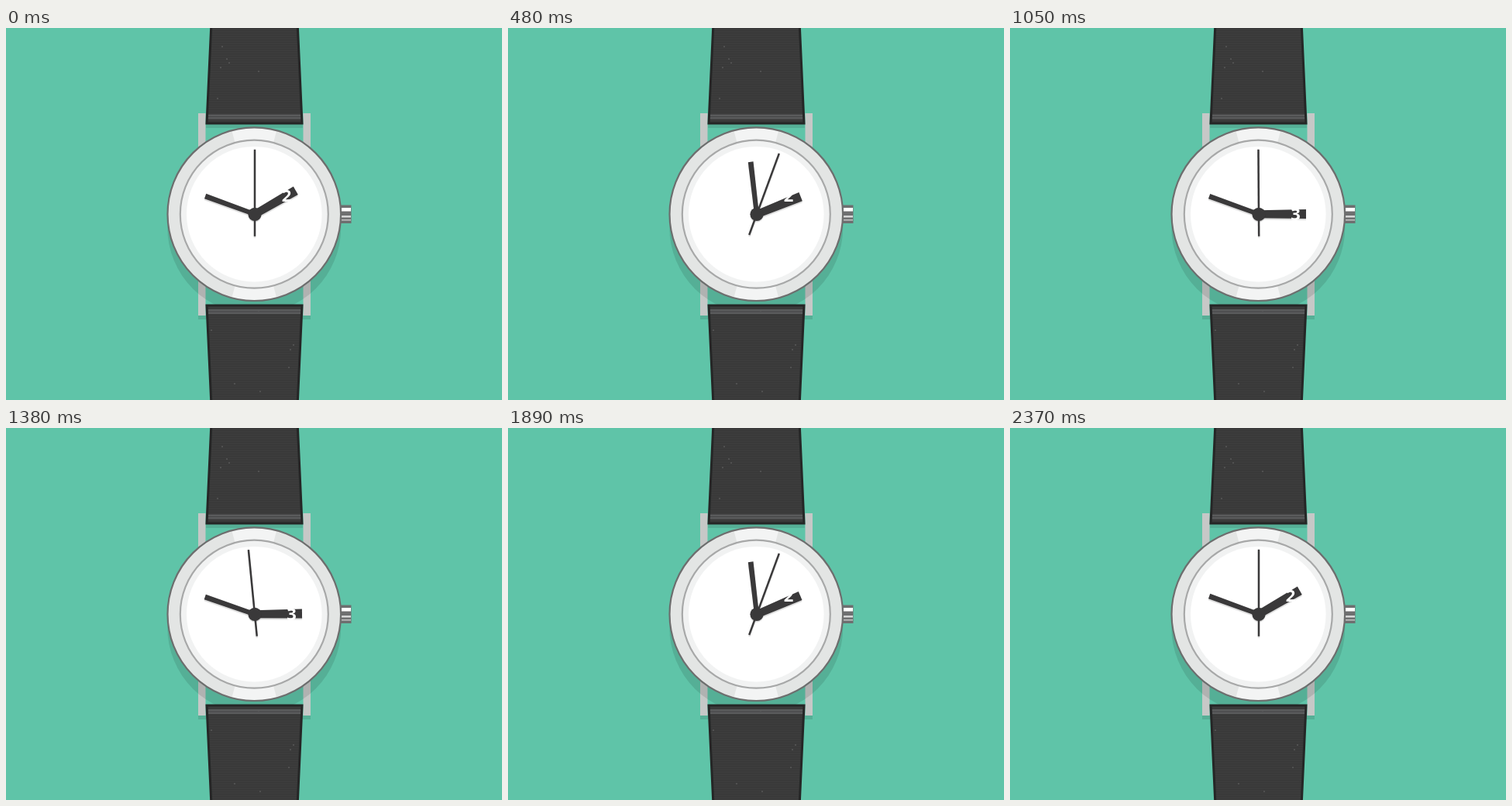
Write an HTML page with a canvas that moves like this. It is 640 by 480 pixels and loops after 2400 ms.

```html
<!DOCTYPE html>
<html lang="en">
<head>
<meta charset="utf-8">
<title>Watch</title>
<style>
  html, body { margin: 0; width: 100%; height: 100%; overflow: hidden; background: #5fc4a8; }
  canvas { display: block; }
</style>
</head>
<body>
<canvas id="stage" width="640" height="480"></canvas>
<script>
const ctx = document.getElementById('stage').getContext('2d');
const CX = 321, CY = 240.3;
const CASE_X = 320.3, CASE_Y = 240.2;
const LOOP = 2400, HALF = 1200, SWEEP = 1170, STEP = 30;
const INK = '#3a393a', SHADOW = 'rgba(0,0,0,.11)', HAND_SHADOW = 'rgba(0,0,0,.13)';

function rect(color, x, y, w, h) {
  ctx.fillStyle = color;
  ctx.fillRect(x, y, w, h);
}

function disc(color, x, y, r, stroke, width) {
  ctx.beginPath();
  ctx.arc(x, y, r, 0, Math.PI * 2);
  ctx.fillStyle = color;
  ctx.fill();
  if (stroke) {
    ctx.strokeStyle = stroke;
    ctx.lineWidth = width;
    ctx.stroke();
  }
}

function polygon(points) {
  const path = new Path2D();
  points.forEach(([x, y]) => path.lineTo(x, y));
  path.closePath();
  return path;
}

// A strap runs from the edge near the case (y0) to outside the stage (y1).
function strap(y0, y1, stripe, specks) {
  const outline = polygon([[259, y0], [382, y0], [376.3, y1], [264.8, y1]]);
  ctx.save();
  ctx.clip(outline);
  rect('#3c3c3c', 250, 0, 140, 480);
  for (let y = Math.min(y0, y1); y < Math.max(y0, y1); y += 3) rect('rgba(0,0,0,.06)', 258, y, 126, 1);
  rect('#5a5b5c', 258, stripe, 126, 6);
  rect('#444546', 258, stripe + 2.5, 126, 1);
  specks.forEach(([x, y]) => disc('#5b5b5b', x, y, 0.9));
  ctx.restore();
  ctx.strokeStyle = '#252626';
  ctx.lineWidth = 3;
  ctx.stroke(outline);
}

function drawWatch() {
  rect('#5fc4a8', 0, 0, 640, 480);
  rect(SHADOW, 248, 371, 145, 5);
  rect(SHADOW, 258, 124, 125, 5);
  for (const x of [248, 383.5]) rect('#c6c8c7', x, 110, 9.5, 261);
  disc(SHADOW, CASE_X, CASE_Y + 17, 112);

  strap(123, -3, 111.5, [[279, 24], [285, 40], [288, 45], [277, 51], [273, 91], [326, 56], [354, 116]]);
  strap(358, 483, 363, [[357, 364], [326, 365], [265, 390], [371, 409], [367, 415], [365, 438], [295, 459], [328, 469]]);

  rect('#6e6f70', 432, 228.5, 13.5, 23.5);
  rect('#ffffff', 433, 232, 12, 4.5);
  rect('#d5d6d6', 433, 242, 12, 2.5);
  rect('#c3c4c4', 433, 247, 12, 1.5);

  disc('#e3e5e4', CASE_X, CASE_Y, 111.8);
  ctx.fillStyle = '#f3f4f4';
  for (const mid of [-Math.PI / 2, Math.PI / 2]) {
    ctx.beginPath();
    ctx.moveTo(CASE_X, CASE_Y);
    ctx.arc(CASE_X, CASE_Y, 111.8, mid - 0.262, mid + 0.262);
    ctx.fill();
  }
  disc('transparent', CASE_X, CASE_Y, 111.8, '#6d6e6e', 2.2);
  disc('#f1f2f2', CASE_X, CASE_Y, 95.5, '#a7a8a8', 2.2);
  disc('#ffffff', CASE_X, CASE_Y, 87.3);
}

// Tapered bar pointing up before rotation, with a shadow just below it.
function hand(degrees, length, tail, baseWidth, tipWidth) {
  const b = baseWidth / 2, w = tipWidth / 2;
  const bar = polygon([[-b, tail], [-w, -length], [w, -length], [b, tail]]);
  for (const [color, drop] of [[HAND_SHADOW, 2], [INK, 0]]) {
    ctx.save();
    ctx.translate(CX, CY + drop);
    ctx.rotate(degrees * Math.PI / 180);
    ctx.fillStyle = color;
    ctx.fill(bar);
    ctx.restore();
  }
}

// White numerals are visible only where the hour hand lies beneath them.
function numerals() {
  ctx.font = '700 22px "Open Sans", sans-serif';
  ctx.textAlign = 'center';
  ctx.fillStyle = '#ffffff';
  for (const hour of [2, 3]) {
    const a = hour * Math.PI / 6;
    ctx.fillText(hour, CX + 47.5 * Math.sin(a), CY - 47.5 * Math.cos(a) + 7.8);
  }
}

// Steep S-curve with a softer landing for the two fast hands.
function snap(u) {
  if (u <= 0) return 0;
  return u < 0.6 ? 1 / (1 + Math.exp(17.2 * (0.5 - u))) : 1 - 15 * (1 - u) ** 5;
}

// Cubic Bezier ease (.68, 0, .29, 1), solved by bisection.
function glide(u) {
  let lo = 0, hi = 1, s = 0.5;
  for (let i = 0; i < 24; i++) {
    const x = 2.04 * s * (1 - s) ** 2 + 0.87 * s * s * (1 - s) + s ** 3;
    if (x < u) lo = s; else hi = s;
    s = (lo + hi) / 2;
  }
  return s * s * (3 - 2 * s);
}

function draw(now) {
  const t = Math.floor((now % LOOP) / STEP) * STEP;
  const u = Math.min((t % HALF) / SWEEP, 1);
  const back = t >= HALF;
  const fast = back ? 1 - snap(u) : snap(u);
  const slow = back ? 1 - glide(u) : glide(u);

  drawWatch();
  hand(60 + 30 * slow, 61, 0, 10, 12);
  numerals();
  hand(290 + 360 * fast, 68, 0, 6, 6.8);
  disc(HAND_SHADOW, CX, CY + 2, 8.5);
  hand(2160 * fast, 83.5, 28.5, 2.5, 2.5);
  disc(INK, CX, CY, 8.6);
  requestAnimationFrame(draw);
}
requestAnimationFrame(draw);
</script>
</body>
</html>
```
